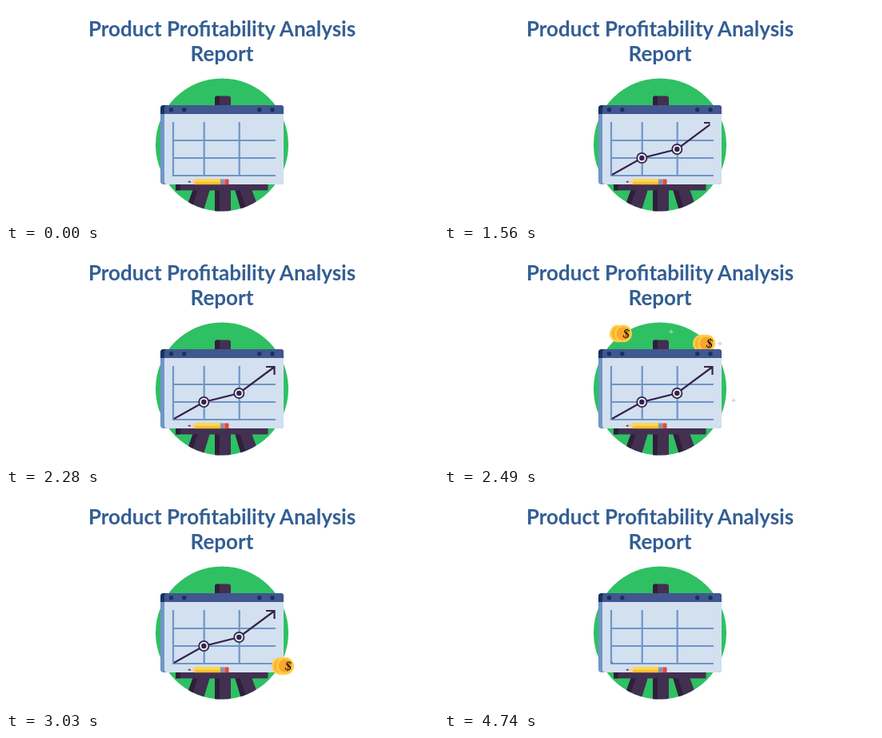
Recreate the animation shown at these times as an HTML page. Size 540 px wide and 270 px high, loop 4.95 s.

```html
<!DOCTYPE html>
<html lang="en">
<head>
<meta charset="utf-8">
<title>Product Profitability Analysis Report</title>
<style>
  html, body { margin: 0; width: 100%; height: 100%; overflow: hidden; background: #fff; }
  svg { position: absolute; left: 0; top: 0; width: 540px; height: 270px; }
  .title { font: 700 26px Lato, sans-serif; fill: #335e93; text-anchor: middle; }

  .trend { animation: wipe 4950ms infinite; }
  .coin { transform: translateY(var(--low)); animation: pop 4950ms var(--at) infinite both; }
  .spark { opacity: 0; animation: twinkle 4950ms var(--at) infinite both; }
  .coin text { font: 700 12px Lato, sans-serif; fill: #ffe9a6; text-anchor: middle; }

  /* Drawn left to right at even speed, wiped back with ease-out */
  @keyframes wipe {
    0%, 7.778% { clip-path: inset(0 331px 0 0); animation-timing-function: linear; }
    32.4%, 76.06% { clip-path: inset(0 203px 0 0); animation-timing-function: cubic-bezier(.333, .667, .667, 1); }
    99.15%, 100% { clip-path: inset(0 332.3px 0 0); }
  }
  @keyframes pop {
    0% { transform: translateY(var(--low)); animation-timing-function: cubic-bezier(.333, .667, .667, 1); }
    4.848%, 6.364% { transform: translateY(var(--high)); animation-timing-function: cubic-bezier(.333, 0, .667, .333); }
    10.303%, 100% { transform: translateY(var(--low)); }
  }
  @keyframes twinkle {
    0% { opacity: 0; }
    3.6%, 6.4% { opacity: 1; }
    10.3%, 100% { opacity: 0; }
  }
</style>
</head>
<body>
<svg viewBox="0 0 540 270">
  <defs>
    <clipPath id="disc"><circle cx="270" cy="173.5" r="83"/></clipPath>
    <clipPath id="floor"><rect width="540" height="262"/></clipPath>
    <clipPath id="board"><rect x="193" y="124" width="154" height="99" rx="4"/></clipPath>
    <path id="star" d="M0-3.5Q.5-.5 3.5 0Q.5.5 0 3.5Q-.5.5-3.5 0Q-.5-.5 0-3.5Z"/>
    <g id="money">
      <circle cx="-3" r="11" fill="#ffd04a"/>
      <circle cx="-3" r="8.5" fill="#fbb034"/>
      <circle cx="3" r="11" fill="#ffcd42"/>
      <circle cx="3" r="8.3" fill="#f9a72e"/>
      <text x="3" y="4.3" transform="rotate(12 3 0)">$</text>
    </g>
    <g id="node">
      <circle r="7" fill="#35234a"/>
      <circle r="5.2" fill="#e9f0f8"/>
      <circle r="3.2" fill="#35234a"/>
    </g>
  </defs>

  <text class="title" x="270" y="38">Product Profitability Analysis</text>
  <text class="title" x="270" y="69">Report</text>

  <circle cx="270" cy="173.5" r="83" fill="#2fc063"/>

  <g fill="#d9d9d9">
    <g class="spark" style="--at:1770ms">
      <use href="#star" x="201" y="98"/>
      <use href="#star" x="174" y="178.5"/>
      <use href="#star" x="244" y="116.5" fill="#7bdc9d"/>
    </g>
    <g class="spark" style="--at:2320ms">
      <use href="#star" x="345" y="117"/>
      <use href="#star" x="362" y="188"/>
      <use href="#star" x="284" y="102" fill="#7bdc9d"/>
    </g>
  </g>

  <g class="coin" style="--at:2345ms;--low:140px;--high:98px"><use href="#money" x="221"/></g>
  <g class="coin" style="--at:2394ms;--low:140px;--high:104px"><use href="#money" x="325"/></g>

  <!-- Easel -->
  <g clip-path="url(#disc)" fill="#432f50">
    <path d="M234 229H255L245 262H222Z"/>
    <path d="M234 229H240L229 262H222Z" fill="#2f1f3b"/>
    <path d="M286 229H307L319 262H296Z"/>
    <path d="M286 229H292L303 262H296Z" fill="#2f1f3b"/>
    <path d="M261 229H281V262H261Z"/>
    <path d="M261 229H267V262H261Z" fill="#2f1f3b"/>
  </g>
  <path d="M261 126V115.500Q261 112.500 264 112.500H278Q281 112.500 281 115.500V126Z" fill="#432f50"/>
  <path d="M261 126V115.500Q261 112.500 264 112.500H267V126Z" fill="#2f1f3b"/>
  <rect x="212" y="220" width="115.500" height="10.500" rx="1.500" fill="#432f50"/>
  <rect x="212" y="220" width="6" height="10.500" rx="1.500" fill="#2f1f3b"/>

  <!-- Board -->
  <g clip-path="url(#board)">
    <rect x="193" y="124" width="154" height="99" fill="#7095c7"/>
    <rect x="198" y="124" width="149" height="99" rx="4" fill="#d3e0f0"/>
    <rect x="193" y="124" width="154" height="11" fill="#15335f"/>
    <path d="M198 135V128Q198 124 202 124H347V135Z" fill="#42568f"/>
  </g>
  <g fill="#15335f">
    <circle cx="206.500" cy="129.700" r="2.700"/>
    <circle cx="222.800" cy="129.700" r="2.700"/>
    <circle cx="316.700" cy="129.700" r="2.700"/>
    <circle cx="333" cy="129.700" r="2.700"/>
  </g>
  <path d="M209 145V212H337M209 168H337M209 190H337M247.700 145V212M291.700 145V212"
        fill="none" stroke="#7095c7" stroke-width="2.200"/>

  <!-- Pencil -->
  <path d="M227 219.800L236.500 216.500V223.200Z" fill="#f6cfb0"/>
  <path d="M227 219.800L230.300 218.600V221Z" fill="#35234a"/>
  <rect x="236" y="216.500" width="32.500" height="6.700" fill="#fbc02f"/>
  <rect x="236" y="216.500" width="32.500" height="3.300" fill="#ffd94f"/>
  <rect x="268" y="216.500" width="5.500" height="6.700" fill="#8d93ad"/>
  <path d="M273.500 216.500H277.500Q278.500 216.500 278.500 217.500V222.200Q278.500 223.200 277.500 223.200H273.500Z" fill="#e5483f"/>
</svg>

<svg class="trend" viewBox="0 0 540 270">
  <path d="M210 211L247.300 190L291.300 179L335 146.500M325 146H335.500V156"
        fill="none" stroke="#35234a" stroke-width="2.200"/>
  <use href="#node" x="247.300" y="190"/>
  <use href="#node" x="291.300" y="179"/>
</svg>

<svg viewBox="0 0 540 270">
  <g clip-path="url(#floor)">
    <g class="coin" style="--at:1770ms;--low:275px;--high:190px"><use href="#money" x="191"/></g>
    <g class="coin" style="--at:2790ms;--low:275px;--high:215px"><use href="#money" x="346"/></g>
  </g>
</svg>
</body>
</html>
```
